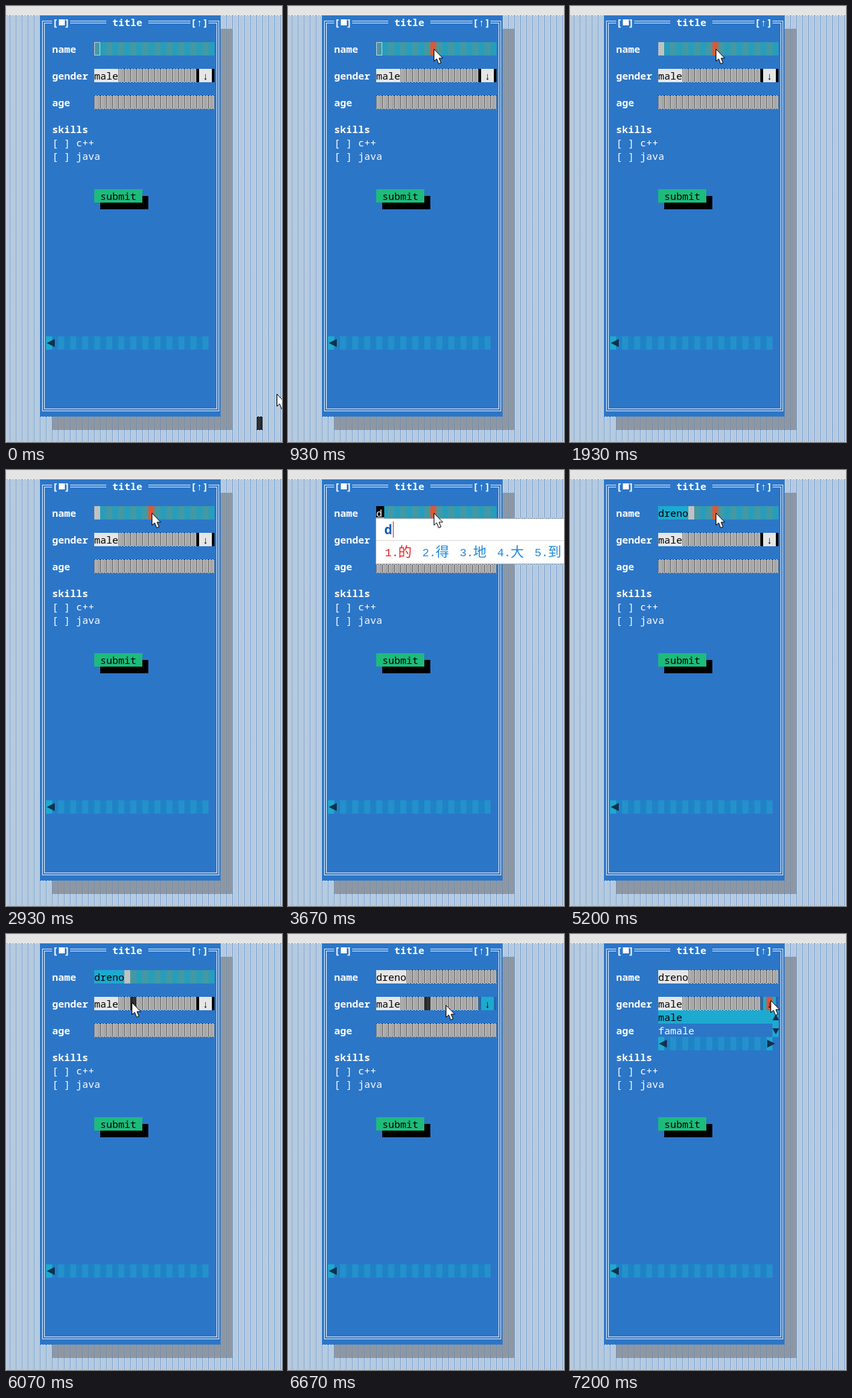
Animation of 413x652 px, one loop 8 s. Source, as an HTML page with a canvas:

```html
<!DOCTYPE html>
<html lang="en">
<head>
<meta charset="utf-8">
<title>Text mode form</title>
<style>
  html, body { margin: 0; width: 100%; height: 100%; overflow: hidden; background: #e4e4e4; }
  canvas { display: block; width: 413px; height: 652px; }
</style>
</head>
<body>
<canvas id="stage" width="413" height="652"></canvas>
<script>
const W = 413, H = 652, LOOP = 8000, STEP = 1000 / 15;
const CW = 9, CH = 20, LEFT = 51, TOP = 14;
const BLUE = '#2c76c8', LIGHT = '#e6e6e6', CYAN = '#1caad0', BLACK = '#000',
      WHITE = '#fff', NAVY = '#12304f', RED = '#e4532f', GREEN = '#1dbb7c';
const MONO = '"Noto Sans Mono", "DejaVu Sans Mono", monospace';
const NAME = 'dreno';
const KEY_TIMES = [3660, 3930, 4130, 4330, 4530];
const COMMIT = 4860, ACTIVATE = 1460, BLUR = 6260, OPEN = 7060;
const COMPOSED = ['d', "d'r", "d're", "d'ren", "d'ren'o"];
const CANDIDATES = [
  ['的', '得', '地', '大', '到'],
  ['大人', '动人', '当然', '敌'],
  ['大热', '低热', '地热', '得'],
  ['大人', '动人', '敌人', '当'],
  ['大人哦', '动人哦', '敌人']
];

const stage = document.getElementById('stage');
let ctx = stage.getContext('2d');

function makeCanvas(w, h) {
  const c = document.createElement('canvas');
  c.width = w;
  c.height = h;
  return c;
}

// Two neighbouring cells; the dots restart at each cell edge.
function makeShade(bg, even, odd = even, period = 4) {
  const c = makeCanvas(CW * 2, CH), g = c.getContext('2d');
  g.fillStyle = bg;
  g.fillRect(0, 0, CW * 2, CH);
  for (let cell = 0; cell < 2; cell++) {
    g.fillStyle = cell ? odd : even;
    for (let y = 0; y < CH; y++)
      for (let x = y % 2 * period / 2; x < CW; x += period) g.fillRect(cell * CW + x, y, 1, 1);
  }
  return ctx.createPattern(c, 'repeat');
}

const SHADES = {
  desk: makeShade(LIGHT, BLUE),
  shadow: makeShade('#9c9c9c', '#6388b5'),
  input: makeShade(LIGHT, BLACK),
  focus: makeShade(CYAN, '#6d8676', '#2f91a8', 2),
  track: makeShade(BLUE, '#128fc3', CYAN, 2),
  dark: makeShade(BLACK, '#a0a0a0'),
  hot: makeShade(RED, '#c46a4a'),
  cursor: makeShade('#cfcfcf', '#8f9c9c')
};

function rect(x, y, w, h, color) {
  ctx.fillStyle = color;
  ctx.fillRect(x, y, w, h);
}

function shade(kind, x, y, w, h) {
  ctx.save();
  ctx.translate(x, y);
  rect(0, 0, w, h, SHADES[kind]);
  ctx.restore();
}

function label(s, x, y, color, bold = false) {
  ctx.font = `${bold ? 700 : 400} 15px ${MONO}`;
  ctx.fillStyle = color;
  ctx.fillText(s, x, y + 16);
}

function poly(points, color) {
  ctx.beginPath();
  points.forEach(([x, y]) => ctx.lineTo(x, y));
  ctx.closePath();
  ctx.fillStyle = color;
  ctx.fill();
}

function sideArrow(x, y, dir) {
  poly([[x - 6 * dir, y - 6], [x + 6 * dir, y], [x - 6 * dir, y + 6]], NAVY);
}

function vertArrow(x, y, dir) {
  poly([[x - 5, y - 4 * dir], [x + 5, y - 4 * dir], [x, y + 5 * dir]], NAVY);
}

function drawFrame() {
  const line = '#dcebfa';
  for (const d of [0, 3]) {
    const x = 54 + d, y = 22 + d, w = 264 - 2 * d, h = 583 - 2 * d;
    rect(x, y, w + 1, 1, line);
    rect(x, y + h, w + 1, 1, line);
    rect(x, y, 1, h, line);
    rect(x + w, y, 1, h, line);
  }
  rect(69, TOP, 27, CH, BLUE);
  rect(150, TOP, 63, CH, BLUE);
  rect(276, TOP, 27, CH, BLUE);
  label('[', 69, TOP, WHITE, true);
  label(']', 87, TOP, WHITE, true);
  rect(79, 20, 9, 9, WHITE);
  label('title', 159, TOP, WHITE, true);
  label('[↑]', 276, TOP, WHITE, true);
}

function drawBase() {
  rect(0, 0, W, H, '#e4e4e4');
  shade('desk', -3, TOP, W + 3, H - TOP);
  shade('shadow', 69, 34, 270, 600);
  rect(LEFT, TOP, 270, 600, BLUE);
  drawFrame();

  label('name', 69, 54, WHITE, true);
  label('gender', 69, 94, WHITE, true);
  label('age', 69, 134, WHITE, true);
  label('skills', 69, 174, WHITE, true);
  label('[ ] c++', 69, 194, WHITE);
  label('[ ] java', 69, 214, WHITE);

  shade('input', 132, 94, 153, CH);
  rect(132, 94, 36, CH, LIGHT);
  label('male', 132, 94, BLACK);
  shade('input', 132, 134, 180, CH);

  rect(141, 284, 72, CH, BLACK);
  rect(132, 274, 72, CH, GREEN);
  label('submit', 141, 274, BLACK);

  shade('track', 69, 494, 234, CH);
  rect(60, 494, CW, CH, CYAN);
  sideArrow(67, 504, -1);
}

const base = makeCanvas(W, H);
ctx = base.getContext('2d');
drawBase();
ctx = stage.getContext('2d');

const mix = (a, b, k) => a + (b - a) * k;
const clamp = v => Math.min(1, Math.max(0, v));
const ease = k => k * k * (3 - 2 * k);

function pointerAt(t) {
  if (t < 0) return [379, 624];
  if (t < 5600) {
    const k = 1 - (1 - clamp(t / 920)) ** 2;
    return [mix(405, 218, k), mix(580, 64, k)];
  }
  if (t < 6450) {
    const k = ease(clamp((t - 5690) / 320));
    return [mix(218, 188, k), mix(64, 102, k)];
  }
  const k = ease(clamp((t - 6460) / 460));
  return [mix(188, 300, k), mix(102, 99, k) + 5 * Math.sin(Math.PI * k)];
}

function drawName(t, typed) {
  const focused = t < BLUR;
  shade(focused ? 'focus' : 'input', 132, 54, 180, CH);
  if (t >= COMMIT) {
    const w = NAME.length * CW;
    rect(132, 54, w, CH, focused ? CYAN : LIGHT);
    label(NAME, 132, 54, BLACK);
    if (focused) shade('cursor', 132 + w, 54, CW, CH);
  } else if (typed) {
    const w = typed * CW + 3;
    rect(132, 54, w, CH, BLACK);
    label(NAME.slice(0, typed), 132, 54, WHITE);
    rect(132, 71, w, 1, WHITE);
  } else if (t >= ACTIVATE) {
    shade('cursor', 132, 54, CW, CH);
  } else {
    ctx.strokeStyle = '#cccccc';
    ctx.lineWidth = 1;
    ctx.strokeRect(132.5, 54.5, CW - 1, CH - 1);
  }
}

function drawCombo(active) {
  rect(285, 94, 27, CH, active ? CYAN : LIGHT);
  const bar = active ? '#2568aa' : BLACK;
  rect(285, 94, 4, CH, bar);
  rect(308, 94, 4, CH, bar);
  label('↓', 294, 94, BLACK, true);
}

function drawList() {
  rect(132, 114, 180, 60, BLUE);
  rect(132, 114, 180, CH, CYAN);
  rect(303, 134, CW, CH, CYAN);
  label('male', 132, 114, BLACK);
  label('famale', 132, 134, WHITE);
  vertArrow(308, 125, -1);
  vertArrow(308, 145, 1);
  shade('track', 141, 154, 153, CH);
  rect(132, 154, CW, CH, CYAN);
  rect(294, 154, CW, CH, CYAN);
  sideArrow(139, 164, -1);
  sideArrow(301, 164, 1);
}

// The mouse cell shows the inverse of the cell below it.
function drawMouseCell([px, py], t) {
  const col = Math.floor((px - LEFT) / CW), row = Math.floor((py - TOP) / CH);
  const x = LEFT + col * CW, y = TOP + row * CH;
  const inWindow = x < 321 && y < 614;
  const inField = x >= 132 && x < 312;
  if (row === 2 && inField && t < BLUR) shade('hot', x, y, CW, CH);
  else if (row === 4 && x >= 285 && inField && t >= BLUR) {
    rect(x, y, CW, CH, RED);
    label('↓', x, y, BLACK, true);
  } else if (!inWindow || (inField && (row === 4 || row === 6))) shade('dark', x, y, CW, CH);
  else rect(x, y, CW, CH, '#d0943a');
}

function drawInputMethod(typed) {
  rect(131, 72, W - 131, 69, '#8fa0b0');
  rect(132, 73, W - 132, 67, WHITE);
  rect(132, 105, W - 132, 1, '#d8d8d8');

  const text = COMPOSED[typed - 1];
  ctx.font = '700 19px "Open Sans", "Noto Sans", sans-serif';
  ctx.fillStyle = '#0c5cbe';
  ctx.fillText(text, 144, 96);
  rect(Math.round(145 + ctx.measureText(text).width), 77, 1, 24, '#e02020');

  let x = 145;
  CANDIDATES[typed - 1].forEach((word, i) => {
    ctx.fillStyle = i ? '#1e88d8' : '#e42222';
    ctx.font = '17px "Liberation Mono", monospace';
    ctx.fillText(i + 1 + '.', x, 129);
    ctx.font = '300 20px "Noto Sans CJK SC", "Noto Sans CJK", sans-serif';
    ctx.fillText(word, x + 20, 130);
    x += 36 + 20 * word.length;
  });
}

function drawPointer([x, y]) {
  ctx.save();
  ctx.translate(Math.round(x) + .5, Math.round(y) + .5);
  poly([[0, 0], [0, 18], [4, 14.5], [7, 22], [10.5, 20.5], [7.5, 13.5], [13, 13.5]], WHITE);
  ctx.strokeStyle = BLACK;
  ctx.lineWidth = 1;
  ctx.stroke();
  ctx.restore();
}

function draw(t) {
  const typed = t < COMMIT ? KEY_TIMES.filter(k => t >= k).length : 0;
  const pointer = pointerAt(t);
  ctx.drawImage(base, 0, 0);
  drawName(t, typed);
  drawCombo(t >= BLUR);
  if (t >= OPEN) drawList();
  // The text screen trails the system pointer by one step.
  drawMouseCell(pointerAt(t - STEP), t);
  if (typed) drawInputMethod(typed);
  drawPointer(pointer);
}

const start = performance.now();
function tick() {
  const t = (performance.now() - start) % LOOP;
  draw(Math.floor((t + 5) / STEP) * STEP);
  requestAnimationFrame(tick);
}
tick();
</script>
</body>
</html>
```
